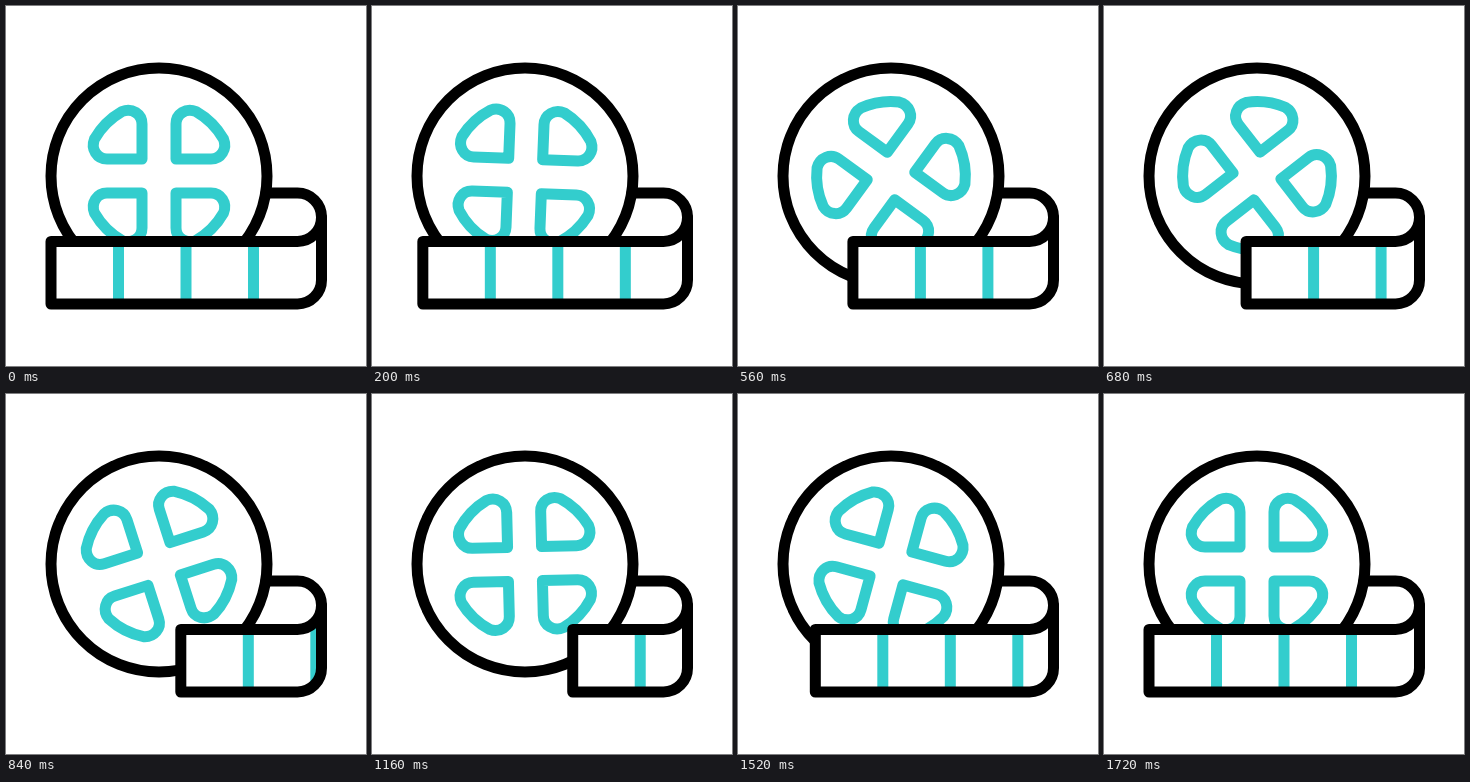
These frames come from a looping animation (360x360 px, 2 s). An HTML page:

```html
<!DOCTYPE html>
<html lang="en">
<head>
<meta charset="utf-8">
<title>Film reel</title>
<style>
  html, body { margin: 0; width: 100%; height: 100%; overflow: hidden; background: #fff; }
  svg { display: block; width: 100vw; height: 100vh; }
  .ink, .teal { fill: none; stroke-width: 11; stroke-linejoin: round; stroke-linecap: round; }
  .ink { stroke: #000; }
  .teal { stroke: #33cdcd; }
  .bars { stroke-linecap: butt; }
</style>
</head>
<body>
<svg viewBox="0 0 360 360">
  <defs>
    <path id="petal" d="M-17-17H-52C-62-17-68.5-27-64.5-37A74 74 0 0 1-37-64.5C-27-68.5-17-62-17-52Z"/>
    <clipPath id="inside"><path class="strip"/></clipPath>
  </defs>
  <g id="reel" class="teal">
    <use href="#petal"/>
    <use href="#petal" transform="rotate(90)"/>
    <use href="#petal" transform="rotate(180)"/>
    <use href="#petal" transform="rotate(270)"/>
  </g>
  <circle class="ink" cx="153" cy="170" r="108"/>
  <path class="ink" d="M260 187H291.5A24 24 0 0 1 315.5 211"/>
  <path class="strip" fill="#fff"/>
  <g clip-path="url(#inside)">
    <path id="bars" class="teal bars" d="M67.5 215V298M135 215V298M202.5 215V298"/>
  </g>
  <path class="strip ink"/>
</svg>
<script>
  const LOOP = 2000, STEP = 40;
  const START = 80, PEAK = 1120, END = 1684;
  const LEFT = 45, TRAVEL = 158;
  const reel = document.getElementById('reel');
  const bars = document.getElementById('bars');
  const strips = document.querySelectorAll('.strip');

  function ease(p) {
    p = Math.min(1, Math.max(0, p));
    return p * p * (3 - 2 * p);
  }

  function pull(t) {
    return t < PEAK
      ? ease((t - START) / (PEAK - START))
      : 1 - ease((t - PEAK) / (END - PEAK));
  }

  function draw(t) {
    const k = pull(t);
    const x = LEFT + TRAVEL * k;
    // the reel turns slightly behind the strip
    const angle = 90 * Math.pow(k, 1.12);
    const outline = `M${x} 235.5H291.5A24 24 0 0 0 315.5 211.5V274A24 24 0 0 1 291.5 298H${x}Z`;
    strips.forEach(s => s.setAttribute('d', outline));
    bars.setAttribute('transform', `translate(${x} 0)`);
    reel.setAttribute('transform', `translate(153 170) rotate(${angle})`);
  }

  function tick() {
    const t = performance.now() % LOOP;
    draw(Math.floor(t / STEP) * STEP);
    requestAnimationFrame(tick);
  }

  tick();
</script>
</body>
</html>
```
